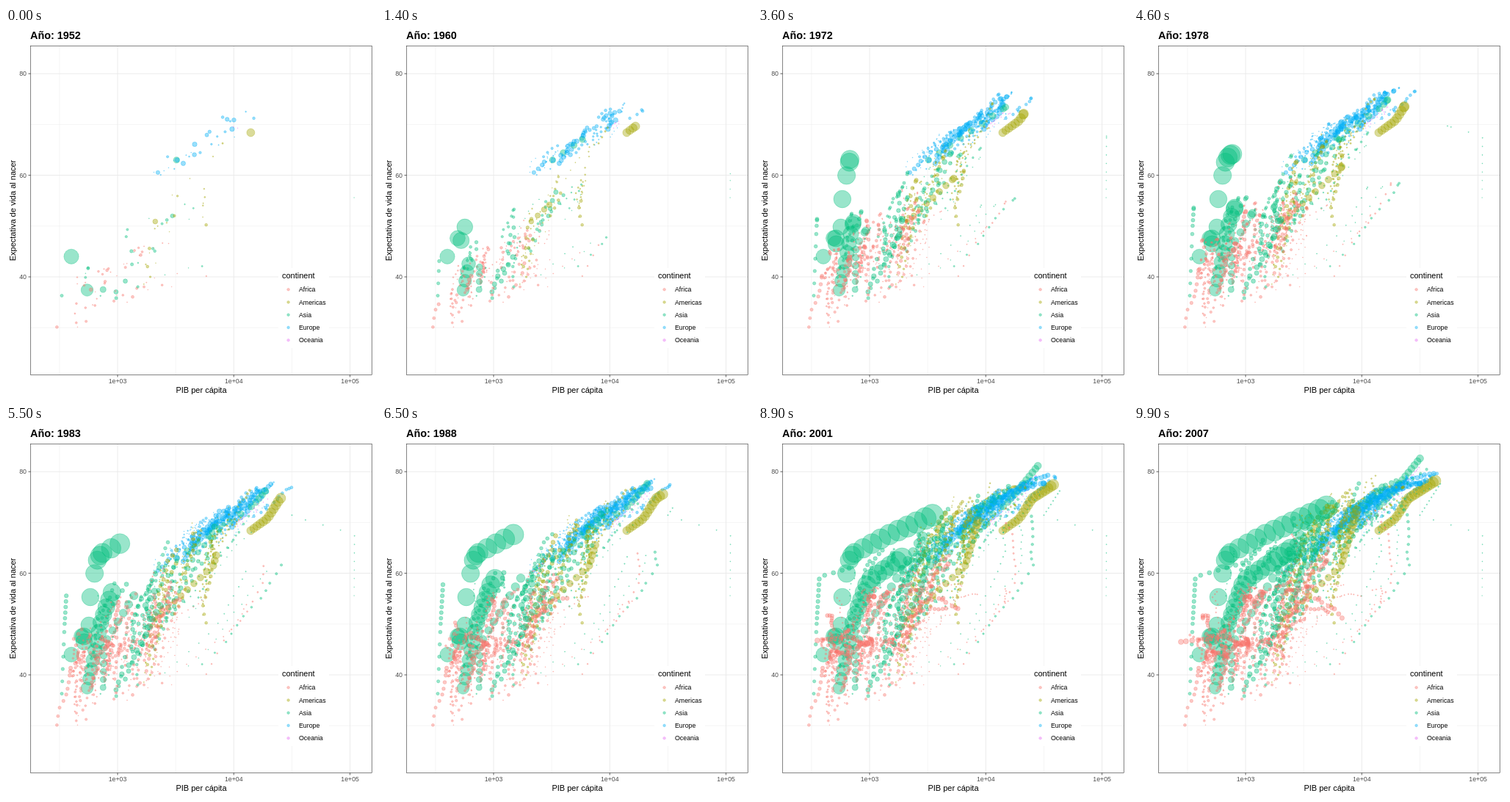
These frames come from a looping animation (504x504 px, 10 s). An HTML page with a canvas:

```html
<!DOCTYPE html>
<html lang="es">
<head>
<meta charset="utf-8">
<title>Expectativa de vida y PIB</title>
<style>
  html, body { margin: 0; width: 100%; height: 100%; overflow: hidden; background: #fff; }
  canvas, svg { position: absolute; left: 0; top: 0; width: 504px; height: 504px; }
  text { font: 11px "Liberation Sans", Arial, sans-serif; }
  #year { font-size: 14.4px; font-weight: bold; }
  .small { font-size: 8.8px; }
  .tick { font-size: 8.8px; fill: #4d4d4d; }
  .mid { text-anchor: middle; }
  .end { text-anchor: end; }
</style>
</head>
<body>
<canvas id="plot" width="504" height="504"></canvas>
<svg viewBox="0 0 504 504">
  <rect x="371" y="327" width="69" height="109" fill="#fff"/>
  <rect x="33.5" y="24.5" width="465" height="448" fill="none" stroke="#333" stroke-width=".6"/>
  <g id="axes"></g>
  <text id="year" x="33" y="15">Año: 1952</text>
  <text class="mid" x="266" y="497">PIB per cápita</text>
  <text class="mid" transform="translate(13 248.5) rotate(-90)">Expectativa de vida al nacer</text>
  <text x="376" y="341">continent</text>
  <g id="legend"></g>
</svg>
<script>
const FRAMES = 100, STEP = 100, TRAIL = 5, FIRST = 1952, SPAN = 55;
const colors = { Africa: '#f8766d', Americas: '#a3a500', Asia: '#00bf7d', Europe: '#00b0f6', Oceania: '#e76bf3' };
const ctx = document.getElementById('plot').getContext('2d');
const year = document.getElementById('year');

let seed = 11;
const rnd = () => (seed = (seed * 16807) % 2147483647) / 2147483647;
const spread = d => (rnd() * 2 - 1) * d;
const mix = (a, b, s) => a + (b - a) * s;
const px = lg => 152 + (lg - 3) * 158.3;
const py = life => 339 - (life - 40) * 6.92;
const radius = millions => .2 + .42 * Math.sqrt(millions);

const countries = [];
// points: [time 0..1, log income, life]
const add = (name, pop0, pop1, points) => countries.push({
  color: colors[name], key: rnd(), r0: radius(pop0), r1: radius(pop1),
  points: points.map(([s, lg, life]) => [s, px(lg), py(life)])
});

// The few paths that stand out, by key points: [year, income, life]
const landmark = (name, pop0, pop1, ...keys) => add(name, pop0, pop1,
  keys.map(([y, income, life]) => [(y - FIRST) / SPAN, Math.log10(income), life]));

landmark('Asia', 556, 1319, [1952, 400, 44], [1957, 576, 50.5], [1962, 488, 44.5], [1967, 613, 58.4],
  [1972, 677, 63.1], [1977, 741, 64], [1987, 1379, 67.3], [2007, 4959, 73]);
landmark('Asia', 372, 1110, [1952, 547, 37.4], [1972, 724, 50.7], [1987, 977, 58.6], [2007, 2452, 64.7]);
landmark('Asia', 82, 223, [1952, 750, 37.5], [1967, 762, 46], [2007, 3541, 70.7]);
landmark('Asia', 86, 127, [1952, 3217, 63], [1972, 14779, 73.4], [2007, 31656, 82.6]);
landmark('Asia', 20, 48, [1952, 331, 36.3], [1967, 349, 49.4], [1992, 370, 59.3], [2007, 944, 62]);
landmark('Asia', .2, 2.5, [1952, 108382, 55.6], [1972, 109348, 67.7], [1982, 31354, 71.3], [2007, 47307, 77.6]);
landmark('Americas', 157, 301, [1952, 13990, 68.4], [1967, 19530, 70.8], [1982, 25010, 74.7], [2007, 42952, 78.2]);
landmark('Americas', 57, 190, [1952, 2109, 50.9], [1977, 6660, 61.5], [2007, 9066, 72.4]);
landmark('Africa', 14, 65, [1952, 781, 39.1], [1972, 905, 46], [1987, 673, 47.5], [2007, 278, 46.5]);

// Everyone else: each range is [base, slope with wealth, noise], at the start and the end.
// The humps bend a path upwards (life) or to the right (boom) halfway.
function group(name, n, { lg0, lg1, life0, life1, hump, boom = 0, pop, grow }) {
  for (let i = 0; i < n; i++) {
    const wealth = (i + rnd()) / n;
    const [a, b, c, d] = [lg0, lg1, life0, life1].map(([base, slope, noise]) => base + slope * wealth + spread(noise));
    const bend = hump * (.4 + rnd());
    const size = .3 + pop * rnd() ** 3;
    add(name, size, size * grow, Array.from({ length: 12 }, (_, j) => {
      const s = j / 11, arch = Math.sin(Math.PI * s);
      return [s, mix(a, b, s) + boom * arch + spread(.04), mix(c, d, s) + bend * arch + spread(.4)];
    }));
  }
}

group('Africa', 49, { lg0: [2.55, .85, .12], lg1: [2.7, 1.05, .25], life0: [34, 9, 5], life1: [46, 16, 8], hump: 5, pop: 30, grow: 3 });
group('Africa', 2, { lg0: [3.5, .2, .08], lg1: [4.1, 0, .05], life0: [38, 4, 3], life1: [58, 14, 2], hump: 3, boom: .3, pop: 2, grow: 3 });
group('Asia', 24, { lg0: [2.7, .85, .15], lg1: [3, 1.5, .2], life0: [36, 18, 6], life1: [62, 17, 3], hump: 3, pop: 45, grow: 3 });
group('Asia', 3, { lg0: [3.45, .4, .05], lg1: [4.15, .2, .05], life0: [41, 2, 3], life1: [71, 3, 1], hump: 2, boom: .3, pop: 10, grow: 4 });
group('Americas', 23, { lg0: [3.15, .75, .12], lg1: [3.45, .8, .14], life0: [41, 21, 5], life1: [69, 9, 3], hump: 3, pop: 25, grow: 2.8 });
group('Europe', 30, { lg0: [3.28, .85, .08], lg1: [3.9, .7, .08], life0: [59, 13, 1.6], life1: [72.5, 7.5, 1.2], hump: 1.8, pop: 60, grow: 1.25 });
group('Oceania', 2, { lg0: [4, .03, 0], lg1: [4.4, .14, 0], life0: [69.3, 0, .1], life1: [80.2, 1, 0], hump: -1.5, pop: 8, grow: 2 });
countries.sort((a, b) => a.key - b.key);

function drawDots(frame) {
  const s = frame / (FRAMES - 1);
  const growth = s * (1.4 - .4 * s);
  for (const { color, points, r0, r1 } of countries) {
    const next = Math.max(1, points.findIndex(p => p[0] >= s));
    const [s0, x0, y0] = points[next - 1], [s1, x1, y1] = points[next];
    const part = (s - s0) / (s1 - s0);
    ctx.fillStyle = ctx.strokeStyle = color;
    ctx.beginPath();
    ctx.arc(mix(x0, x1, part), mix(y0, y1, part), mix(r0, r1, growth), 0, 7);
    ctx.fill();
    ctx.stroke();
  }
}

function drawGrid() {
  ctx.strokeStyle = '#ebebeb';
  const lines = (width, logs, lives) => {
    ctx.lineWidth = width;
    ctx.beginPath();
    for (const lg of logs) { ctx.moveTo(px(lg), 24.5); ctx.lineTo(px(lg), 472.5); }
    for (const life of lives) { ctx.moveTo(33.5, py(life)); ctx.lineTo(498.5, py(life)); }
    ctx.stroke();
  };
  lines(.5, [2.5, 3.5, 4.5], [30, 50, 70]);
  lines(1, [3, 4, 5], [40, 60, 80]);
}

function draw(frame) {
  ctx.globalAlpha = 1;
  ctx.clearRect(0, 0, 504, 504);
  drawGrid();
  ctx.globalAlpha = .4;
  ctx.lineWidth = .75;
  for (let k = 0; k < frame; k += TRAIL) drawDots(k);
  drawDots(frame);
  year.textContent = 'Año: ' + Math.round(FIRST + SPAN * frame / (FRAMES - 1));
}

const mark = path => `<path d="${path}" stroke="#333" stroke-width=".8"/>`;
document.getElementById('axes').innerHTML =
  [40, 60, 80].map(v => mark(`M30.5 ${py(v)}h3`) +
    `<text class="tick end" x="28" y="${py(v) + 3}">${v}</text>`).join('') +
  [3, 4, 5].map(v => mark(`M${px(v)} 472.5v3`) +
    `<text class="tick mid" x="${px(v)}" y="484">1e+0${v}</text>`).join('');

document.getElementById('legend').innerHTML = Object.entries(colors).map(([name, color], i) => {
  const y = 356.2 + i * 17.25;
  return `<circle cx="384.6" cy="${y}" r="1.8" fill="${color}" stroke="${color}" stroke-width=".75" fill-opacity=".4" stroke-opacity=".4"/>
    <text class="small" x="399" y="${Math.round(y + 3.2)}">${name}</text>`;
}).join('');

const start = performance.now();
let shown = -1;
function tick() {
  const frame = Math.floor((performance.now() - start) / STEP) % FRAMES;
  if (frame !== shown) draw(shown = frame);
  requestAnimationFrame(tick);
}
tick();
</script>
</body>
</html>
```
